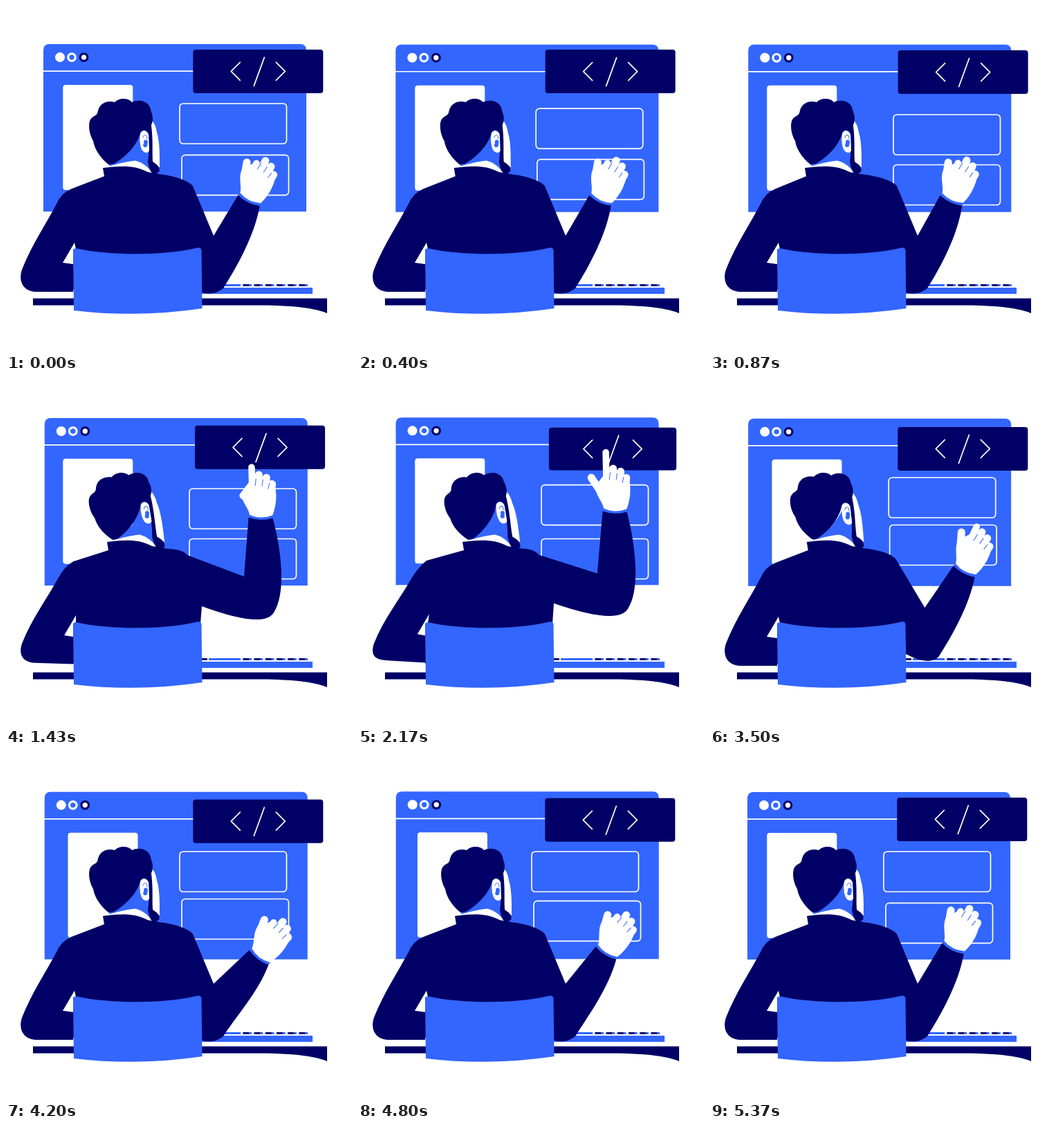
Write an HTML page that moves like this. It is 500 px wide and 500 px high and loops after 5.41 s.

```html
<!DOCTYPE html>
<html lang="en">
<head>
<meta charset="utf-8">
<title>Developer at work</title>
<style>
  html, body { margin: 0; width: 100%; height: 100%; overflow: hidden; background: #fff; }
  svg { display: block; width: 100vw; height: 100vh; }
  .navy { fill: #000066; }
  .blue { fill: #3366ff; }
  .white { fill: #fff; }
  .line { fill: none; stroke: #fff; stroke-width: 1.7; stroke-linejoin: round; stroke-linecap: round; }
  .finger { fill: none; stroke: #fff; stroke-width: 11; stroke-linecap: round; stroke-linejoin: round; }
  .crease { fill: none; stroke: #3366ff; stroke-width: 1; stroke-linecap: round; }
  #index { stroke-width: 9.5; }
</style>
</head>
<body>
<svg viewBox="0 0 500 500">
  <g id="window">
    <path class="blue" d="M0,242V9Q0,0 9,0H371Q380,0 380,9V242Z"/>
    <path class="line" d="M0,39H380"/>
    <circle class="white" cx="24" cy="19" r="7"/>
    <circle cx="41" cy="19" r="5.3" fill="#3366ff" stroke="#fff" stroke-width="3.2"/>
    <circle cx="58.5" cy="19" r="5.3" fill="#fff" stroke="#000066" stroke-width="3.2"/>
  </g>
  <rect id="page" class="white" width="101" height="152" rx="4"/>
  <rect id="boxA" class="line" width="154.5" height="58" rx="5"/>
  <rect id="boxB" class="line" width="154.5" height="58" rx="5"/>
  <g id="code">
    <rect class="navy" x="-94" y="-31.5" width="188" height="63" rx="4"/>
    <path id="less" class="line" d="M-26,-13L-39,0L-26,13"/>
    <path class="line" d="M9,-20L-6,21"/>
    <path id="more" class="line" d="M26,-13L39,0L26,13"/>
  </g>

  <path class="navy" d="M39,422.5H464V444C445,436 415,433 370,432.5H39Z"/>
  <rect class="blue" x="270" y="407" width="173" height="9"/>
  <g id="keys"></g>

  <g id="neck">
    <path class="blue" d="M148,229C168,220 188,202 193,182L208,178L211,228L221,242L205,250L160,240Z"/>
    <path class="white" d="M141,234C158,229 176,224 187,223.500C198,226 207,234 212,243L200,246L141,240Z"/>
  </g>
  <path id="body" class="navy"/>
  <path id="gap" class="white"/>
  <path id="cuff" class="blue"/>

  <g id="head">
    <g id="face">
      <path class="white" d="M-3,-3C6,2 8,11 9,18C12,27 13.500,40 13,68L2,64L-2,25Z"/>
      <path class="navy" d="M-5,4C-1,28 -2,47 -4,60C-2,72 2,78 6,79L12.500,74C13.500,67 9,64 3,60C2,43 4,24 0,2Z"/>
    </g>
    <path class="navy" d="M148,229C136,219 128,207 126,195C119,183 119,169 122,164C127,157 132,160 133,151C136,140 147,136 157,139C164,132 177,133 182,139C194,133 209,139 209.500,152C214,161 212,172 207,176L206,185C203,178 197,178 194,183C191,199 174,218 156,228Z"/>
    <path class="white" d="M194,185C196,178 204,179 206,186L207,209C205,214 198,212 196,207C193,200 193,192 194,185Z"/>
    <path class="crease" d="M198,190C200,184 204,186 204,192"/>
    <path class="blue" d="M199,195Q203,191 205,196L204,203Q199,206 198,201Q200,198 199,195Z"/>
  </g>

  <g id="hand">
    <path class="white" d="M-16,0C-18,-10 -29,-19 -29,-32L-18,-47L18,-47C24,-32 22,-12 17,0Q0,7 -16,0Z"/>
    <path class="finger" d="M-4,-36V-58M6,-36L7,-54M14,-30L15.500,-45"/>
    <path id="thumb" class="finger"/>
    <path id="index" class="finger"/>
    <path class="crease" d="M-8,-52L-9,-42M2,-51L1,-42M11.500,-46L10,-38"/>
  </g>

  <path class="blue" d="M97,354Q97,349 103,350.500C150,361 232,361 276,349.500Q282.500,348 282.500,354L283.500,437Q190,451 98,440Z"/>
</svg>
<script>
const LOOP = 5410;
const REST = { wrist: [351, 281], raise: 0, point: 0, thumb: 1, shift: 0 };
const POSES = [
  { at: 0, ...REST },
  { at: 870, ...REST, wrist: [348.5, 281], shift: -3 },
  { at: 1430, wrist: [368, 199], raise: 1, point: 0.7, thumb: 0.45, shift: 6 },
  { at: 2170, wrist: [371, 190], raise: 1.05, point: 1.15, thumb: 1, shift: 11 },
  { at: 2830, wrist: [369, 260], raise: 0.4, point: 0.85, thumb: 1, shift: -0.5 },
  { at: 4200, ...REST, wrist: [365.5, 294] },
  { at: LOOP, ...REST }
];
const [START, GRAB, REACH, PRESS, SLIDE, DROP, END] = POSES.map(p => p.at);

const $ = id => document.getElementById(id);
const draw = (id, d) => $(id).setAttribute("d", d);
const move = (id, x, y, extra = "") => $(id).setAttribute("transform", `translate(${x} ${y})${extra}`);
const add = ([x, y], dx, dy) => [x + dx, y + dy];
const mix = (a, b, u) => Array.isArray(a) ? a.map((v, i) => mix(v, b[i], u)) : a + (b - a) * u;

function ease(t, from, to) {
  const u = Math.min(1, Math.max(0, (t - from) / (to - from)));
  return u * u * (3 - 2 * u);
}

function poseAt(t) {
  const next = POSES.findIndex(p => p.at > t);
  const a = POSES[next - 1], b = POSES[next];
  const u = ease(t, a.at, b.at);
  return Object.fromEntries(Object.keys(REST).map(k => [k, mix(a[k], b[k], u)]));
}

function drawScreen(t) {
  const turn = 2 * Math.PI * t / LOOP;
  const bob = 0.8 * Math.sin(2 * turn);
  move("window", 54.9 - 0.9 * Math.cos(2 * turn), 55.1 + bob);
  move("page", 82.3 + 7.2 * (ease(t, PRESS, 3300) - ease(t, DROP, END)), 114 + bob);

  const pull = ease(t, START, GRAB), release = ease(t, SLIDE, DROP);
  move("boxA", 251 + 14 * (pull - release), 141 + 16 * (pull - ease(t, 1750, SLIDE)));
  move("boxB", 254 + 11 * (pull - release),
    215.3 + 14.2 * pull - 20 * ease(t, PRESS, SLIDE) + 5.8 * ease(t, DROP, END));

  const press = ease(t, REACH, PRESS) - ease(t, PRESS, SLIDE);
  const slide = ease(t, START, PRESS) - ease(t, PRESS, DROP);
  move("code", 364.3 + 3.7 * slide, 97.4 - 3 * Math.cos(turn - 0.1), `scale(${1 - 0.02 * press})`);
  move("less", -4 * press, 0);
  move("more", 4 * press, 0);
}

function drawHead({ shift, point }) {
  const look = Math.min(1, point * 1.4);
  move("neck", shift, 0);
  move("head", shift, 0, `rotate(${-7 * look} 165 228)`);
  move("face", 209, 165, `scale(1 ${1 + 0.12 * look})`);
}

function drawBody({ wrist, raise, point, thumb, shift }) {
  // The elbow swings outward on its way from the lowered to the raised arm.
  const swing = (low, high) => add(mix(low, high, raise), 8 * raise * (1 - raise), 42 * raise * (1 - raise));
  const inner = swing([300, 332], [344, 284]);
  const elbow = swing([314, 408], [387, 336]);
  const side = [283, mix(414, 327, raise)];
  const shoulder = mix([270, 260], [262, 253], raise);

  const joint = mix(inner, elbow, 0.5);
  const angle = Math.atan2(wrist[0] - joint[0], joint[1] - wrist[1]);
  const cos = Math.cos(angle), sin = Math.sin(angle);
  const fromWrist = (x, y) => add(wrist, x * cos - y * sin, x * sin + y * cos);
  const left = fromWrist(-17.5, 0), right = fromWrist(17.5, 0);

  const lift = Math.max(0, shift) * 0.7;
  draw("body", `M${140 + shift},234C${162 + shift},231 ${186 + shift},229 ${205 + shift},240
    L${222 + shift},243C${240 + shift * 0.6},245 ${add(shoulder, -8, -9)} ${shoulder}
    L${inner}L${left}L${right}C${fromWrist(30, 42)} ${add(elbow, 19, -30)} ${elbow}
    Q${add(elbow, -14, 11 + 13 * raise)} ${side}
    L281,352L270,410H97V${413 - lift * 0.6}L42,${413 - lift}
    C27,${412 - lift} 17,400 23,381C37,345 ${59 + lift * 0.5},313 ${73 + lift * 0.6},286
    Q${80 + lift},270 ${95 + lift * 0.5},${264 - lift * 0.4}L${142 + shift},246Z`);
  const up = lift * 0.5;
  draw("gap", `M${82 + up},${371 - up}L${99 + up},${342 - up}L101,351L97,352V${373 - up}Z`);
  draw("cuff", `M${left}Q${fromWrist(0, 6)} ${right}L${fromWrist(17, -9)}L${fromWrist(-17, -9)}Z`);

  move("hand", ...fromWrist(0, -4), `rotate(${angle * 180 / Math.PI})`);
  draw("index", `M-13,-36L${-14 - point},${-49 - 28 * point}`);
  draw("thumb", `M-17,-16L-21,-24L${-21 - thumb * (6 + 7 * point)},${-14 - 30 * thumb}`);
}

function drawKeys() {
  const key = (x, w, cls) => `<rect x="${x}" y="402" width="${w}" height="3" class="${cls}"/>`;
  let row = key(283, 8, "navy") + key(293, 46, "blue");
  for (let i = 0; i < 6; i++) row += key(342 + i * 16.2, 13, "blue") + key(343 + i * 16.2, 8, "navy");
  $("keys").innerHTML = row;
}

const start = performance.now();
function tick() {
  const t = (performance.now() - start) % LOOP;
  const pose = poseAt(t);
  drawScreen(t);
  drawHead(pose);
  drawBody(pose);
  requestAnimationFrame(tick);
}
drawKeys();
tick();
</script>
</body>
</html>
```
